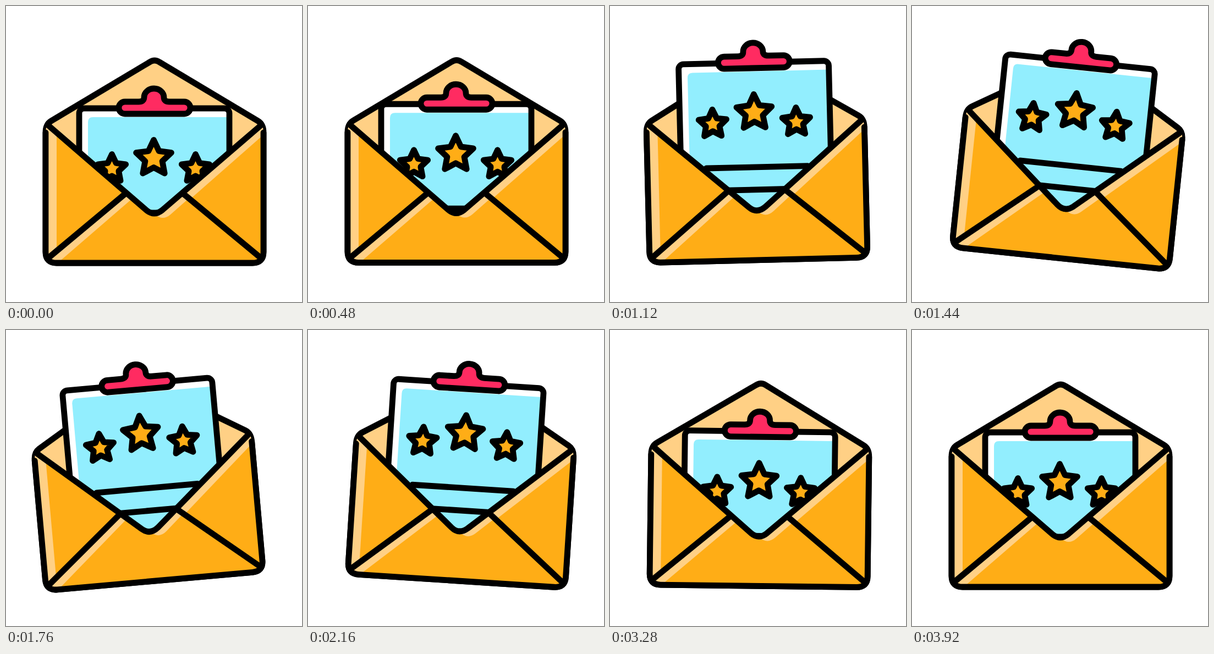
An HTML page for the animation above (4 s loop, 538 by 538 pixels).

```html
<!DOCTYPE html>
<html lang="en">
<head>
<meta charset="utf-8">
<title>Review letter</title>
<style>
  html, body { margin: 0; height: 100%; overflow: hidden; background: #fff; }
  svg { display: block; width: 100%; height: 100%; }
  .ink { stroke: #000; stroke-width: 10.8; stroke-linecap: round; stroke-linejoin: round; }
  .light { fill: #ffd085; }
  .orange { fill: #ffad16; }
  .none { fill: none; }
</style>
</head>
<body>
<svg viewBox="0 0 538 538">
  <defs>
    <path id="body" d="M72 230Q72 215 82 209L261 102Q270 96 279 102L458 209Q468 215 468 230V447Q468 467 448 467H92Q72 467 72 447Z"/>
    <rect id="sheet" x="133" y="186" width="273" height="520" rx="9"/>
    <clipPath id="inBody"><use href="#body"/></clipPath>
    <clipPath id="aboveBase"><rect y="-200" width="538" height="640"/></clipPath>
  </defs>
  <g id="envelope">
    <use href="#body" class="ink light"/>
    <g clip-path="url(#aboveBase)">
      <g id="paper">
        <use href="#sheet" fill="#fff"/>
        <path d="M149 720V211Q149 202 158 202H406V720Z" fill="#92eefe"/>
        <use href="#sheet" class="ink none"/>
        <path d="M179 376h184m-184 41h184m-184 41h184" class="ink none"/>
        <g id="stars" class="ink orange"></g>
        <path class="ink" fill="#ff2b61" d="M216 174H241Q251 174 251 166a18 16 0 0 1 36 0Q287 174 297 174H324a11 11 0 0 1 0 22H216a11 11 0 0 1 0-22Z"/>
      </g>
    </g>
    <g clip-path="url(#inBody)">
      <path class="light" d="M72 211L255 371Q269 383 284 371L468 211V467H72Z"/>
      <path class="orange" d="M92 230L217 339L92 446Z"/>
      <path class="orange" d="M468 234L336 350L468 463Z"/>
      <path class="orange" d="M94 467L233 347L271 379Q285 391 299 379L333 349L468 463V467Z"/>
    </g>
    <path class="ink none" d="M78 218L255 371Q269 383 284 371L462 218M78 457L217 341M462 457L322 341"/>
    <path class="ink none" d="M72 230V447Q72 467 92 467H448Q468 467 468 447V230"/>
  </g>
</svg>
<script>
  const LOOP = 4000, STEP = 80, PEAK = 1400;
  const $ = id => document.getElementById(id);

  // Eased 0 to 1 between two times
  function ease(t, from, to) {
    const u = Math.min(1, Math.max(0, (t - from) / (to - from)));
    return (1 - Math.cos(Math.PI * u)) / 2;
  }

  // A rocking swing that slows and fades, after a slight lean to the left
  function tilt(t) {
    const u = t - PEAK;
    const start = ease(t, 1000, PEAK);
    const fade = Math.max(0, 1 - u / 2200);
    const swing = 6.4 * fade * Math.cos(2 * Math.PI * u / (780 + 0.058 * u));
    return start * swing - 0.5 * (1 - start) * ease(t, 500, 800);
  }

  const lift = t => 11.5 * Math.sin(Math.PI * t / LOOP) ** 3;

  // Up past the resting height and back, then the same on the way in
  const rise = t =>
    119 * (ease(t, 420, 800) - ease(t, 2970, 3270)) -
    41 * (ease(t, 800, 1120) - ease(t, 2720, 2970));

  function star(cx, cy, r) {
    const points = Array.from({ length: 10 }, (_, i) => {
      const d = i % 2 ? r * 0.49 : r, a = i * Math.PI / 5;
      return [cx + d * Math.sin(a), cy - d * Math.cos(a)].map(v => v.toFixed(1));
    });
    return `<polygon points="${points.join(' ')}"/>`;
  }

  $('stars').innerHTML = star(192.5, 296, 26.5) + star(268.5, 277, 33.5) + star(344.5, 296, 26.5);

  function draw(now) {
    const t = Math.floor(now % LOOP / STEP) * STEP;
    $('envelope').setAttribute('transform', `translate(0 ${-lift(t)}) rotate(${tilt(t)} 270 462)`);
    $('paper').setAttribute('transform', `translate(0 ${-rise(t)})`);
    requestAnimationFrame(draw);
  }
  draw(0);
</script>
</body>
</html>
```
